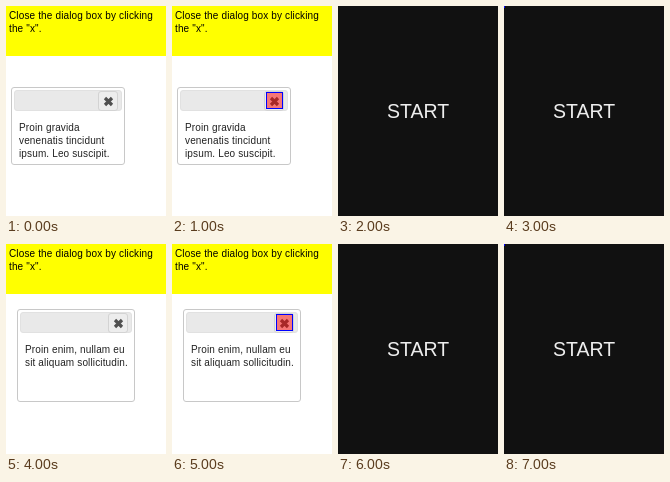
Animation, 160 px wide and 210 px high, one loop 8 s. Source, as an HTML page:

```html
<!DOCTYPE html>
<html lang="en">
<head>
<meta charset="utf-8">
<title>Dialog test</title>
<style>
  html, body { margin: 0; width: 100%; height: 100%; overflow: hidden; background: #fff; }
  body { position: relative; font: 10px/13px "Liberation Sans", Arial, sans-serif; letter-spacing: .14px; }
  div, svg { position: absolute; box-sizing: border-box; white-space: nowrap; }
  .task { left: 0; top: 0; width: 160px; height: 50px; padding: 3px; background: #ff0; color: #000; }
  .dialog { border: 1px solid #c8c8c8; border-radius: 3px; background: #fff; color: #222; }
  .bar { left: 2px; right: 2px; top: 2px; height: 21px; border: 1px solid #e1e1e1; border-radius: 3px; background: #e9e9e9; }
  .close { right: 6px; top: 3px; width: 20px; height: 20px; border: 1px solid #d3d3d3; border-radius: 3px; background: #ededed; }
  .close svg { left: 4px; top: 4px; }
  .mark { right: 7px; top: 4px; width: 17px; height: 17px; border: 1px solid #00f; background: rgba(255, 0, 0, .5); }
  .text { left: 7px; top: 33px; }
  .cover { left: 0; top: 0; width: 160px; height: 210px; background: #111; color: #eee;
           font-size: 19.5px; line-height: 210px; letter-spacing: normal; text-align: center; }
  .dot { left: 0; top: 0; width: 1px; height: 2px; background: #00f; }
  [hidden] { display: none; }
</style>
</head>
<body>
<div class="task">Close the dialog box by clicking<br>the "x".</div>
<div class="cover">START<div class="dot"></div></div>
<script>
  const dialogs = [
    { x: 5, y: 81, w: 114, h: 78, text: "Proin gravida<br>venenatis tincidunt<br>ipsum. Leo suscipit." },
    { x: 11, y: 65, w: 118, h: 93, text: "Proin enim, nullam eu<br>sit aliquam sollicitudin." }
  ].map(({ x, y, w, h, text }) => {
    const box = document.createElement("div");
    box.className = "dialog";
    box.style.cssText = `left:${x}px;top:${y}px;width:${w}px;height:${h}px`;
    box.innerHTML = `<div class="bar"></div>
      <div class="close"><svg width="11" height="11"><path d="M2 2L9 9M9 2L2 9" stroke="#505050" stroke-width="3.2"/></svg></div>
      <div class="mark"></div><div class="text">${text}</div>`;
    document.body.insertBefore(box, document.querySelector(".cover"));
    return { box, mark: box.querySelector(".mark") };
  });
  const cover = document.querySelector(".cover");
  const dot = document.querySelector(".dot");

  const STEP = 1000;
  const phases = ["open", "marked", "start", "ready"];

  function show(step) {
    const phase = phases[step % 4];
    dialogs.forEach(({ box, mark }, i) => {
      box.hidden = i !== Math.floor(step / 4);
      mark.hidden = phase !== "marked";
    });
    cover.hidden = phase === "open" || phase === "marked";
    dot.hidden = phase !== "ready";
  }

  const begin = performance.now();
  function tick(now) {
    show(Math.floor(Math.max(0, now - begin) / STEP) % 8);
    requestAnimationFrame(tick);
  }
  show(0);
  requestAnimationFrame(tick);
</script>
</body>
</html>
```
